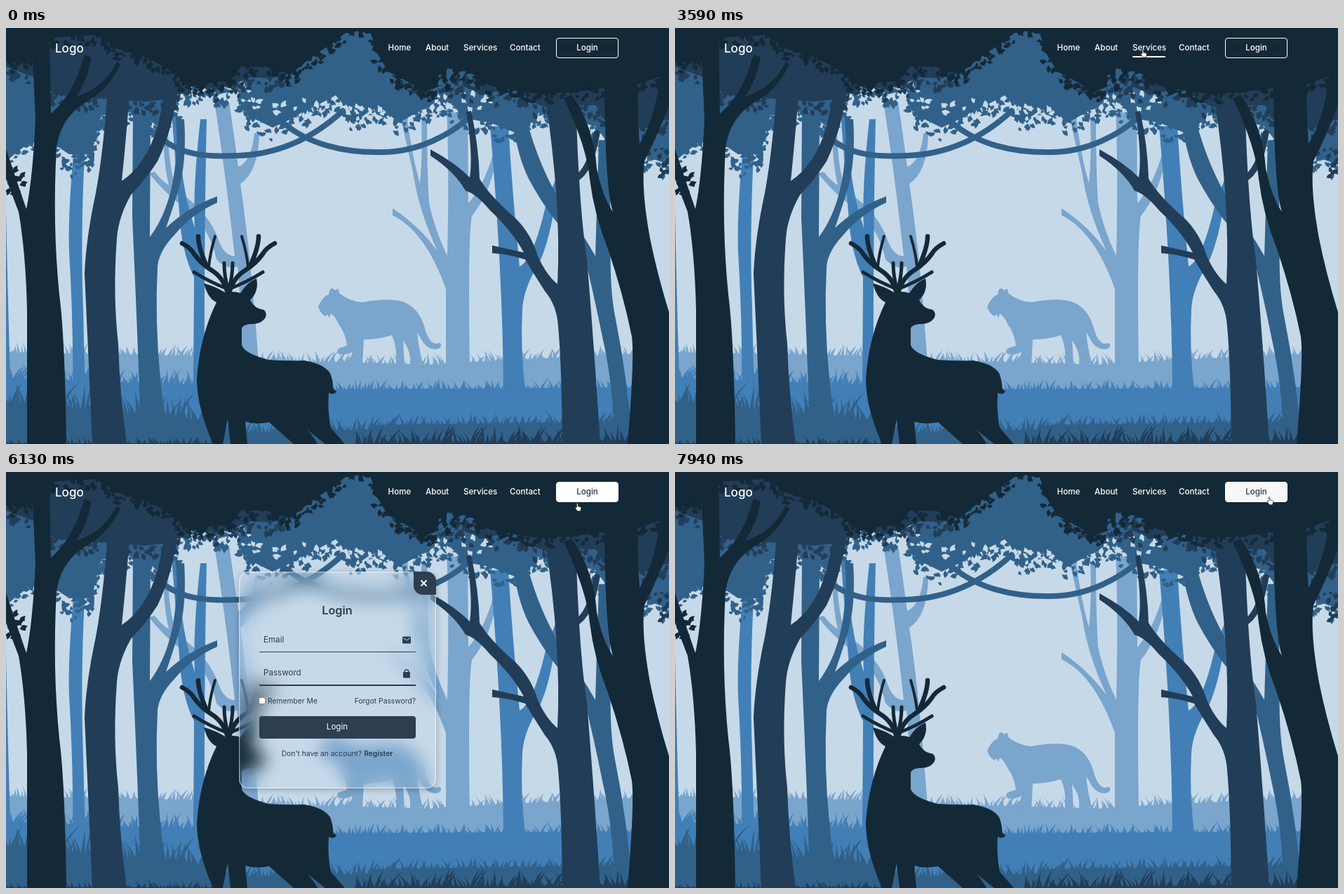
An HTML page with a canvas that plays this animation: 945 px wide and 593 px high, repeating every 8 s.

```html
<!DOCTYPE html>
<html lang="en">
<head>
<meta charset="utf-8">
<title>Forest login</title>
<style>
html, body { margin: 0; width: 945px; height: 593px; overflow: hidden; background: #142937; }
body { position: relative; font: 500 11.6px Inter, "Open Sans", sans-serif; color: #fff; }
canvas, svg, .at, .box { position: absolute; }
canvas { left: 0; top: 0; }
.at { transform: translateY(-50%); line-height: 1.2; white-space: nowrap; }
.mid { transform: translate(-50%, -50%); }
.right { transform: translate(-100%, -50%); }
.line { height: 2px; border-radius: 2px; background: #fff; }
#enter { left: 784px; top: 14px; width: 89px; height: 29px; box-sizing: border-box; border: 1.5px solid #fff; border-radius: 4px; line-height: 26px; text-align: center; }
#popup { left: 332px; top: 142px; width: 280.5px; height: 309px; border-radius: 13px; color: #2c3e50; font-weight: 400;
  backdrop-filter: blur(12.5px); box-shadow: inset 0 0 0 1.3px rgba(255,255,255,.55), 0 2px 8px rgba(0,0,0,.25); }
#popup .box { background: #2c3e50; }
#popup svg { left: 0; top: 0; width: 281px; height: 309px; }
.small { font-size: 10.3px; }
b { font-weight: 600; }
#cursor { left: 0; top: 0; width: 14px; height: 16px; overflow: visible; }
</style>
</head>
<body>
<canvas id="scene" width="945" height="593"></canvas>
<span class="at" style="left:70px;top:29px;font-size:17px">Logo</span>
<div id="nav"></div>
<div id="enter" class="box">Login</div>

<div id="popup" class="box">
  <div class="box" style="right:0;top:0;width:32px;height:32.5px;border-radius:0 13px 0 13px"></div>
  <b class="at mid" style="left:140px;top:56px;font-size:16.3px">Login</b>
  <span class="at" style="left:35px;top:98px">Email</span>
  <div class="box" style="left:29px;top:113.5px;width:223px;height:1.5px"></div>
  <span class="at" style="left:35px;top:145px">Password</span>
  <div class="box" style="left:29px;top:161px;width:223px;height:1.5px"></div>
  <div class="box" style="left:29px;top:180px;width:8px;height:8px;border-radius:1.5px;background:#fff;box-shadow:0 0 0 .6px #777"></div>
  <span class="at small" style="left:41px;top:184px">Remember Me</span>
  <span class="at right small" style="left:252px;top:184px">Forgot Password?</span>
  <div class="box" style="left:29px;top:206px;width:223px;height:31.5px;border-radius:4px"></div>
  <span class="at mid" style="left:140px;top:222px;color:#fff">Login</span>
  <span class="at mid small" style="left:140px;top:259px">Don't have an account? <b>Register</b></span>
  <svg viewBox="0 0 281 309">
    <path d="M259.5 12.5l8 8m0-8l-8 8" stroke="#fff" stroke-width="1.9" fill="none"/>
    <rect x="233" y="92.5" width="12" height="10" rx="1.2" fill="#2c3e50"/>
    <path d="M234 94.5l5 3.4 5-3.4" stroke="#c6d9e9" fill="none"/>
    <rect x="234" y="143" width="10" height="8.5" rx="1.2" fill="#2c3e50"/>
    <path d="M236.3 144v-1.7a2.7 2.7 0 0 1 5.4 0v1.7" stroke="#2c3e50" stroke-width="1.4" fill="none"/>
  </svg>
</div>

<svg id="cursor">
  <path id="arrow" d="M0 0V10.4L2.4 8.2 4.1 12 5.9 11.2 4.3 7.5H7.5Z" fill="#1a1a1a" stroke="#fff" stroke-width=".9"/>
  <path id="hand" d="M-.9 6.8V1.1Q0 -.4 .9 1.1V4.8L4.4 5.8Q5.9 6.4 5.5 8.4L4.6 11.8H.4L-2.7 8Q-3.2 6.5 -2 6.4Z" fill="#fff" stroke="#1a1a1a" stroke-width=".7"/>
</svg>

<script>
const $ = id => document.getElementById(id);
const ctx = $('scene').getContext('2d');
const SKY = '#c6d9e9', PALE = '#7aa5cc', BLUE = '#427fb6', STEEL = '#316189', NAVY = '#223d57', DARK = '#142937';

let seed = 7;
function rnd(a = 0, b = 1) {
  seed = (seed * 1664525 + 1013904223) >>> 0;
  return a + (b - a) * seed / 4294967296;
}

function fill(color, d) {
  ctx.fillStyle = color;
  ctx.fill(new Path2D(d));
}
function stroke(color, width, d) {
  ctx.strokeStyle = color;
  ctx.lineWidth = width;
  ctx.stroke(new Path2D(d));
}

function leaf(x, y) {
  const s = rnd(6, 13);
  ctx.save();
  ctx.translate(x, y);
  ctx.rotate(rnd(0, Math.PI * 2));
  ctx.beginPath();
  ctx.moveTo(-s / 2, 0);
  ctx.quadraticCurveTo(-s * .1, -s * .5, s / 2, -s * .1);
  ctx.quadraticCurveTo(s * .1, s * .1, s * .15, s * .35);
  ctx.quadraticCurveTo(-s * .2, s * .3, -s / 2, 0);
  ctx.fill();
  ctx.restore();
}

function scatter(color, cx, cy, rx, ry, n) {
  ctx.fillStyle = color;
  while (n--) {
    const a = rnd(0, Math.PI * 2), r = Math.sqrt(rnd());
    leaf(cx + rx * r * Math.cos(a), cy + ry * r * Math.sin(a));
  }
}

// Foliage hanging from the top edge down to a leafy border.
function canopy(color, edge, spread = 20) {
  fill(color, `M${edge[0]} -5L${edge.join(' ')} ${edge.at(-2)} -5Z`);
  for (let i = 0; i < edge.length - 2; i += 2) {
    const [x, y, x2, y2] = edge.slice(i, i + 4);
    const n = Math.hypot(x2 - x, y2 - y) / 2.6;
    for (let j = 0; j < n; j++) {
      const k = rnd();
      leaf(x + (x2 - x) * k + rnd(-6, 6), y + (y2 - y) * k + rnd(-8, spread));
    }
  }
}

function grass(color, x0, y0, x1, y1, height) {
  fill(color, `M${x0} ${y0}L${x1} ${y1}V600H${x0}Z`);
  for (let x = x0; x < x1; x += rnd(2, 6)) {
    const y = y0 + (y1 - y0) * (x - x0) / (x1 - x0) + 5;
    const h = rnd(.4, 1) * height, lean = rnd(-.7, .7) * h, w = rnd(2, 4);
    fill(color, `M${x - w} ${y}Q${x} ${y - h * .5} ${x + lean} ${y - h}Q${x + w} ${y - h * .4} ${x + w} ${y}Z`);
  }
}

function drawFarTrees() {
  fill(PALE, 'M333 480Q336 400 330 340Q314 345 300 330Q292 290 262 262Q225 235 204 207L212 205Q222 218 232 224Q224 190 224 140H231Q231 200 244 232Q290 262 304 305Q312 325 326 325Q312 200 297 105H318Q326 160 331 198Q350 190 354 150L361 150Q360 205 334 222Q350 330 360 480Z');
  fill(PALE, 'M627 485V372Q598 290 551 267V257Q590 283 615 318Q588 260 580 205L563 130 572 128Q578 180 590 222Q594 180 592 130H600Q600 200 603 250Q612 290 629 325Q632 200 628 115H658L659 250Q684 220 695 176L698 190Q690 235 664 268Q658 300 661 485Z');
  fill(PALE, 'M445 397Q452 382 460 380Q461 371 465 371L470 374Q474 368 475 378Q490 390 508 391Q545 384 565 390Q588 398 596 425Q602 448 612 450L619 449Q623 456 613 458Q598 458 590 440L586 434Q588 455 594 478H576Q578 462 566 445L568 480H556Q558 455 550 438Q530 444 510 444L508 480H488L494 462Q480 468 473 464Q470 458 476 456L486 453Q484 435 474 422Q470 412 463 407L461 413 458 408 456 411Q448 408 445 397Z');
  grass(PALE, 0, 462, 300, 468, 22);
  grass(PALE, 300, 472, 620, 480, 22);
  grass(PALE, 620, 478, 945, 462, 22);
}

function drawMiddleTrees() {
  fill(BLUE, 'M94 593Q98 450 90 320Q88 270 96 180H112Q106 300 110 400Q112 500 116 593Z');
  fill(BLUE, 'M266 593Q268 400 268 355Q250 320 247 262L236 120H243Q248 210 262 262L269 285Q266 230 277 130H286Q282 300 283 593Z');
  fill(BLUE, 'M709 515Q708 350 690 140H716Q722 240 732 340Q752 330 770 250L784 214V240Q776 300 760 335Q738 370 736 400Q733 460 740 515Z');
  fill(BLUE, 'M0 260Q3 400 6 500H0Z');
  grass(BLUE, 0, 498, 300, 510, 30);
  grass(BLUE, 300, 516, 945, 512, 20);
}

function drawSteelLayer() {
  canopy(STEEL, [0, 190, 30, 165, 60, 160, 90, 180, 122, 180, 135, 125, 190, 118, 215, 140, 240, 112, 262, 88, 290, 98,
    330, 88, 345, 125, 380, 142, 410, 128, 440, 112, 470, 96, 500, 132, 530, 110, 560, 135, 590, 118, 625, 106, 650, 128,
    690, 135, 728, 150, 760, 120, 840, 140, 870, 180, 905, 180, 945, 195]);
  scatter(SKY, 300, 92, 62, 20, 34);
  scatter(SKY, 520, 120, 45, 12, 18);
  scatter(SKY, 405, 112, 55, 14, 14);
  scatter(SKY, 650, 105, 50, 14, 20);
  scatter(STEEL, 100, 195, 26, 18, 22);
  fill(STEEL, 'M193 593Q186 400 180 270L181 120H206L205 298Q232 262 240 205Q246 165 242 130H254Q258 190 246 230Q236 262 228 285Q260 255 301 240V249Q265 265 240 295Q218 318 216 340Q212 420 220 500L230 593Z');
  fill(STEEL, 'M866 593Q868 520 850 440Q838 380 822 315Q780 280 745 215Q728 180 722 130H742Q760 200 795 255Q820 290 840 325Q842 260 845 160H860L862 300Q860 370 868 410Q886 500 893 593Z');
  stroke(STEEL, 8, 'M212 150C250 185 290 183 330 182C390 180 440 155 480 118M395 135C430 165 480 178 535 177C590 177 635 150 660 128');
  grass(STEEL, 0, 532, 290, 560, 42);
  grass(STEEL, 290, 578, 520, 572, 28);
  grass(STEEL, 520, 566, 945, 560, 22);
}

function drawNavyLayer() {
  fill(NAVY, 'M123 593Q118 480 112 350Q114 300 128 235Q140 170 146 70H178Q172 150 165 218Q200 195 216 140L232 70 247 72Q240 140 216 190Q200 215 178 238Q160 270 158 300Q152 380 160 450Q162 520 172 593Z');
  fill(NAVY, 'M793 593Q792 480 787 425Q785 395 768 375Q752 350 740 330Q715 322 693 321V310Q715 315 738 320Q722 290 690 260Q670 236 655 232Q640 205 605 182V173Q640 192 661 213Q666 180 656 120L663 118Q674 170 675 215Q690 240 725 270Q748 292 758 325Q770 352 786 365Q792 250 768 95H812Q816 250 828 330Q838 450 847 593Z');
  stroke(NAVY, 9, 'M811 215Q833 205 842 150');
  canopy(NAVY, [0, 55, 40, 70, 70, 95, 130, 100, 200, 105, 240, 100, 262, 75, 300, 88, 330, 78, 350, 70, 380, 72, 420, 55], 18);
  canopy(NAVY, [548, 60, 600, 85, 640, 78, 680, 95, 720, 85, 760, 110, 840, 110, 870, 150, 945, 130], 18);
  grass(NAVY, 0, 592, 300, 592, 16);
  grass(NAVY, 500, 592, 945, 588, 32);
}

function drawDarkLayer() {
  canopy(DARK, [0, 45, 20, 52, 38, 40, 62, 14, 130, 10, 160, 30, 200, 42, 235, 60, 262, 84, 290, 78, 320, 74, 335, 55, 370, 55, 405, 66, 440, 38, 462, 24, 488, 4, 500, 2], 14);
  canopy(DARK, [496, 4, 520, 8, 530, 38, 545, 62, 575, 78, 595, 92, 620, 82, 650, 62, 690, 82, 730, 90, 760, 94, 800, 92, 850, 86, 900, 80, 945, 65], 14);
  scatter(STEEL, 425, 62, 32, 14, 12);
  scatter(STEEL, 640, 74, 42, 14, 16);
  fill(DARK, 'M30 593V400Q28 320 18 262L0 215V172Q14 215 29 258Q38 215 42 130L36 0H62L64 122Q90 100 104 62L112 38 122 42Q116 75 100 98Q140 85 158 48L163 52Q145 90 110 108Q78 130 72 170Q66 280 76 380Q84 440 86 593Z');
  fill(DARK, 'M886 593Q896 470 892 440Q880 380 858 315Q838 265 832 215Q828 170 795 100L806 95Q838 140 842 200Q850 240 865 262Q854 230 853 80L858 0H902Q898 100 903 165Q925 130 932 70L945 60V110Q930 150 910 190Q905 230 918 300Q928 350 945 405V593Z');
  scatter(DARK, 12, 225, 14, 30, 18);
  scatter(NAVY, 930, 190, 16, 22, 14);
}

function drawDeer() {
  fill(DARK, 'M295 593Q272 540 272 500Q276 440 300 391Q288 386 282 364Q298 368 314 378Q324 374 334 378Q344 362 357 357Q361 375 348 388Q354 400 368 402Q373 408 369 414Q362 423 348 422Q338 423 336 428V452Q340 464 374 473Q400 475 425 474Q452 478 462 492Q467 505 466 514L471 518Q468 524 460 520Q458 545 463 570L483 593H455L430 573Q440 585 444 593H410L375 562Q355 566 341 561L344 593H320L316 558 309 593Z');
  for (const side of [1, -1]) {
    ctx.save();
    ctx.translate(317, 0);
    ctx.scale(side, 1);
    ctx.translate(-317, 0);
    stroke(DARK, 6.5, 'M316 378Q310 356 294 346Q278 336 268 322Q264 314 251 307M274 297Q274 312 285 337');
    stroke(DARK, 5, 'M268 348Q290 362 316 372M311 335Q311 355 317 374');
    stroke(DARK, 4, 'M298 297Q291 320 289 340');
    ctx.restore();
  }
}

function drawScene() {
  ctx.lineCap = ctx.lineJoin = 'round';
  ctx.fillStyle = SKY;
  ctx.fillRect(0, 0, 945, 593);
  drawFarTrees();
  drawMiddleTrees();
  drawSteelLayer();
  drawNavyLayer();
  drawDarkLayer();
  drawDeer();
}

const LOOP = 8000, STEP = 78.1, FADE = 330;

// label, left, width, hover start, hover end
const links = [
  ['Home', 544.5, 34, 2120, 2600],
  ['About', 598, 34, 2630, 3150],
  ['Services', 652, 46.5, 3210, 3790],
  ['Contact', 718, 46, 3830, 4920]
].map(([text, left, width, from, to]) => {
  const label = document.createElement('span'), line = document.createElement('div');
  label.className = 'at';
  label.textContent = text;
  label.style.cssText = `left:${left}px;top:28.5px`;
  line.className = 'box line';
  line.style.cssText = `left:${left}px;top:39.7px;width:${width}px`;
  $('nav').append(label, line);
  return { line, from, to };
});
const buttonHovers = [[4980, 6150], [7680, LOOP]];

const path = [
  [750, 94, 88], [1540, 743, 56], [1840, 592, 27.5], [1930, 585, 27], [2000, 585, 27], [2330, 562, 30], [2480, 562, 30],
  [2950, 613, 31], [3030, 613, 31], [3420, 664, 30], [3590, 667, 30], [3650, 667, 30], [3890, 727, 31], [4100, 748, 31],
  [4790, 748, 31], [5300, 816, 43], [6100, 816, 43], [6820, 603, 165], [6930, 603, 165], [6990, 602, 165],
  [7230, 602, 165], [7900, 847, 35]
];

// The standard CSS "ease" curve.
function ease(x) {
  if (x <= 0) return 0;
  if (x >= 1) return 1;
  let lo = 0, hi = 1;
  for (let i = 0; i < 18; i++) {
    const s = (lo + hi) / 2;
    if (.75 * s * (1 - s) + s ** 3 < x) lo = s; else hi = s;
  }
  return .3 * lo * (1 - lo) ** 2 + 3 * lo * lo * (1 - lo) + lo ** 3;
}
const shown = (t, from, to) => ease((t - from) / FADE) - ease((t - to) / FADE);
const within = (t, from, to) => t >= from && t < to;

function cursorAt(t) {
  const i = path.findIndex(p => p[0] > t);
  if (i < 0) return path.at(-1).slice(1);
  const [t0, x0, y0] = path[i - 1], [t1, x1, y1] = path[i];
  const u = (t - t0) / (t1 - t0), k = u * u * (3 - 2 * u);
  return [x0 + (x1 - x0) * k, y0 + (y1 - y0) * k];
}

function render(time) {
  const t = 750 + STEP * Math.floor((time - 730) / STEP);

  for (const { line, from, to } of links) {
    line.style.transformOrigin = t < to ? 'left' : 'right';
    line.style.transform = `scaleX(${shown(t, from, to)})`;
  }

  const lit = buttonHovers.reduce((sum, [a, b]) => sum + shown(t, a, b), 0);
  const mix = (a, b) => Math.round(a + (b - a) * lit);
  $('enter').style.background = `rgba(255,255,255,${lit})`;
  $('enter').style.color = `rgb(${mix(255, 34)},${mix(255, 54)},${mix(255, 73)})`;

  const size = shown(t, 5570, 7160);
  $('popup').style.display = size > .005 ? 'block' : 'none';
  $('popup').style.transform = `scale(${size})`;

  const visible = t >= 750;
  $('cursor').style.display = visible ? 'block' : 'none';
  if (visible) {
    const [x, y] = cursorAt(t);
    const pointing = links.some(l => within(t, l.from, l.to)) ||
      buttonHovers.some(([a, b]) => within(t, a, b)) || within(t, 6700, 7300);
    $('cursor').style.transform = `translate(${x}px,${y}px)`;
    $('hand').style.display = pointing ? 'inline' : 'none';
    $('arrow').style.display = pointing ? 'none' : 'inline';
  }
}

drawScene();
const start = performance.now();
function tick() {
  render((performance.now() - start) % LOOP);
  requestAnimationFrame(tick);
}
tick();
</script>
</body>
</html>
```
